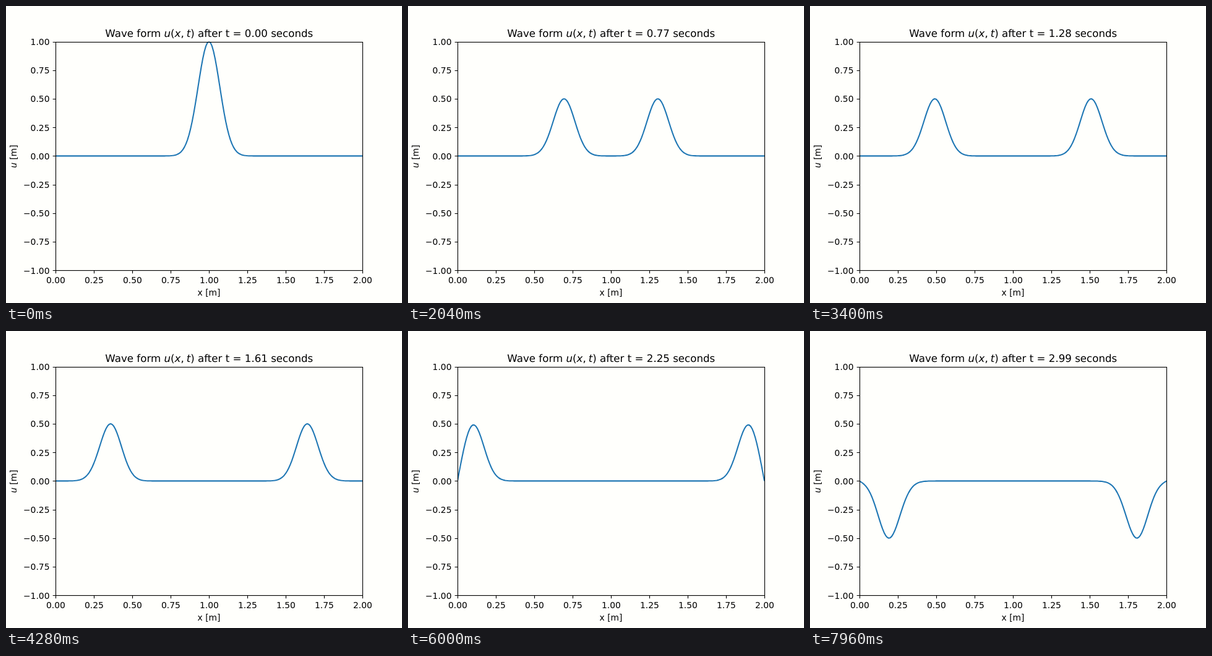
Animation, 640 px wide and 480 px high, one loop 8000 ms. Source, as an HTML page:

```html
<!DOCTYPE html>
<html lang="en">
<head>
<meta charset="utf-8">
<title>Wave form</title>
<style>
  html, body { margin: 0; width: 100%; height: 100%; overflow: hidden; background: #fffffc; }
  svg { display: block; width: 640px; height: 480px; }
  text { font: 13.889px "DejaVu Sans", sans-serif; text-anchor: middle; white-space: pre; }
  .title { font-size: 16.667px; text-rendering: geometricPrecision; }
  .ylabels text { text-anchor: end; }
  .math { font-style: italic; }
  .axes { fill: none; stroke: #000; stroke-width: 1.11; }
  #wave { fill: none; stroke: #1f77b4; stroke-width: 2.083; stroke-linejoin: round; }
</style>
</head>
<body>
<svg viewBox="0 0 640 480">
  <clipPath id="plot"><rect x="80" y="57.6" width="496" height="369.6"/></clipPath>
  <path id="wave" clip-path="url(#plot)"/>
  <path id="ticks" class="axes"/>
  <rect class="axes" x="80.5" y="58.5" width="496" height="369"/>
  <g id="xlabels"></g>
  <g id="ylabels" class="ylabels"></g>
  <text x="328" y="468">x [m]</text>
  <text transform="translate(17 243) rotate(-90)"><tspan class="math">u</tspan> [m]</text>
  <text class="title" x="328.3" y="50">Wave form <tspan class="math">u</tspan>(<tspan class="math">x</tspan>,<tspan class="math" dx="4">t</tspan>) after t = <tspan id="clock">0.00</tspan> seconds</text>
</svg>
<script>
const FRAME_MS = 40, FRAMES = 200;
const DX = 0.01, DT = 0.015, SPEED = 0.4, CELLS = 200;
const byId = id => document.getElementById(id);
const toX = x => 80 + 248 * x;
const toY = u => 242.4 - 184.8 * u;
const snap = v => Math.round(v) + 0.5;

function addLabel(group, x, y, value) {
  const label = document.createElementNS("http://www.w3.org/2000/svg", "text");
  label.setAttribute("x", x);
  label.setAttribute("y", y);
  label.textContent = value.toFixed(2).replace("-", "\u2212");
  byId(group).append(label);
}

let ticks = "";
for (let i = 0; i <= 8; i++) {
  const x = toX(i / 4), y = toY(i / 4 - 1);
  ticks += `M${snap(x)} 427.5v4.86M80.5 ${snap(y)}h-4.86`;
  addLabel("xlabels", x + 0.5, 448, i / 4);
  addLabel("ylabels", 70.5, Math.round(y + 5.3), i / 4 - 1);
}
byId("ticks").setAttribute("d", ticks);

// Finite-difference wave equation: string at rest, both ends fixed.
const courant2 = (SPEED * DT / DX) ** 2;
const bend = (u, i) => i % CELLS ? courant2 * (u[i + 1] - 2 * u[i] + u[i - 1]) : 0;
const start = Array.from({ length: CELLS + 1 }, (_, i) => Math.exp(-100 * (i * DX - 1) ** 2));
const states = [start, start.map((v, i) => v + bend(start, i) / 2)];
while (states.length < FRAMES) {
  const [before, now] = states.slice(-2);
  states.push(now.map((v, i) => i % CELLS ? 2 * v - before[i] + bend(now, i) : v));
}
const paths = states.map(u => "M" + u.map((v, i) => `${toX(i * DX).toFixed(2)} ${toY(v).toFixed(2)}`).join("L"));

function draw() {
  const frame = Math.floor(performance.now() / FRAME_MS) % FRAMES;
  byId("wave").setAttribute("d", paths[frame]);
  byId("clock").textContent = (Math.round(frame * 1.5) / 100).toFixed(2);
  requestAnimationFrame(draw);
}
draw();
</script>
</body>
</html>
```
